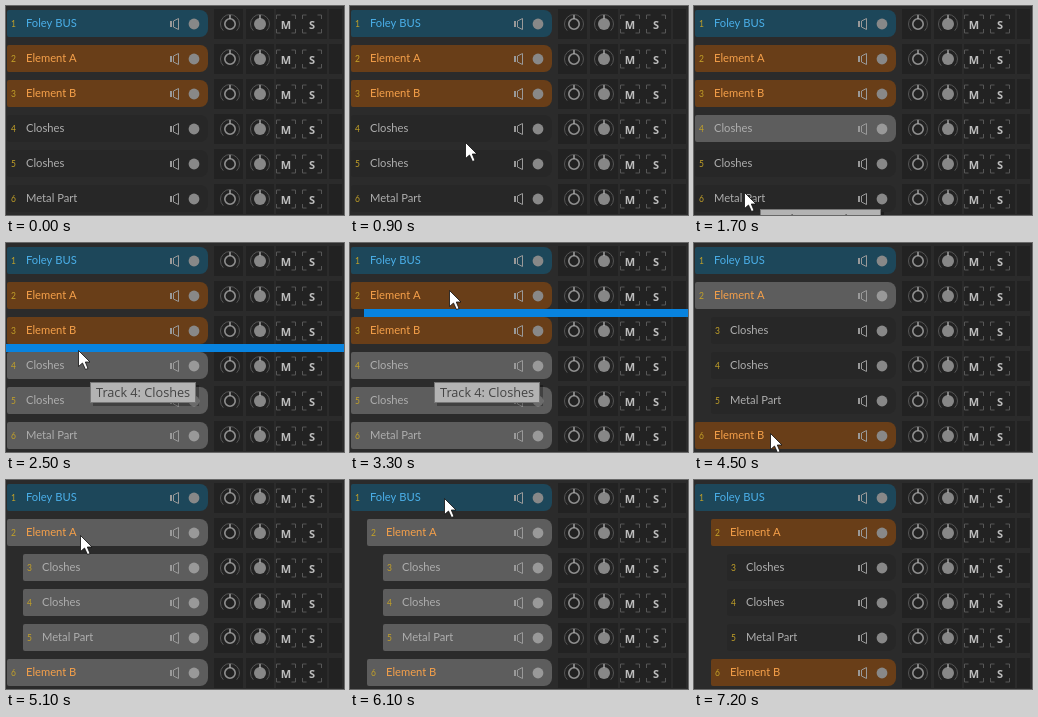
These frames come from a looping animation (338x209 px, 8300 ms). An HTML page with a canvas:

```html
<!DOCTYPE html>
<html lang="en">
<head>
<meta charset="utf-8">
<title>Track folders</title>
<style>
  html, body { margin: 0; width: 100%; height: 100%; overflow: hidden; background: #2b2b2b; }
  canvas { display: block; }
</style>
</head>
<body>
<canvas id="stage" width="338" height="209"></canvas>
<script>
const stage = document.getElementById('stage');
const ctx = stage.getContext('2d');
const LOOP = 8300, STEP = 100;
const PITCH = 35, BAR_HEIGHT = 27, BAR_RIGHT = 202, INDENT = 16, LINE_HEIGHT = 8;
const SELECTED = '#5d5d5d';

const makeTrack = (name, bar, color) => ({ name, bar, color });
const bus = makeTrack('Foley BUS', '#1d475a', '#4bb0ea');
const elementA = makeTrack('Element A', '#693e18', '#f5a04a');
const elementB = makeTrack('Element B', '#693e18', '#f5a04a');
const closhes = makeTrack('Closhes', '#272727', '#aeaeae');
const metal = makeTrack('Metal Part', '#272727', '#aeaeae');
const parts = [closhes, closhes, metal];

// A nested list is a folder; its depth sets the indent.
const flatten = (tree, depth = 0) => tree.flatMap(item =>
  Array.isArray(item) ? flatten(item, depth + 1) : { ...item, depth });

const select = (first, last = first) => ({ first, last });
const dropAt = (row, depth) => ({ row, depth });
const trackTip = (row, name, x, y) => ({ text: `Track ${row}: ${name}`, x, y, fill: '#b3b3b3' });
const panTip = { text: 'Pan: center (double click to set to center)', x: 110, y: 118, fill: '#fff' };

// Each entry changes part of the state from its time on.
const story = [
  [0, { rows: flatten([bus, elementA, elementB, ...parts]) }],
  [1100, { selection: select(3) }],
  [1700, { tip: trackTip(6, 'Metal Part', 66, 203) }],
  [1800, { tip: null, selection: select(3, 5) }],
  [2300, { tip: trackTip(4, 'Closhes', 84, 139) }],
  [2500, { drop: dropAt(3, 0) }],
  [2600, { drop: dropAt(2, 0) }],
  [3100, { drop: dropAt(2, 1) }],
  [3500, { drop: null, tip: null, selection: select(2, 4),
           rows: flatten([bus, elementA, parts, elementB]) }],
  [3800, { selection: select(1) }],
  [3900, { tip: panTip }],
  [4300, { tip: null }],
  [4700, { selection: select(1, 5) }],
  [5300, { drop: dropAt(1, 0) }],
  [5500, { drop: dropAt(1, 1) }],
  [5900, { drop: null, rows: flatten([bus, [elementA, parts, elementB]]) }],
  [6300, { selection: select(0) }],
  [7200, { selection: null }]
];

// Pointer glides: start, duration, destination.
const glides = [
  [500, 800, 79, 119], [1300, 100, 50, 186], [1800, 300, 68, 123],
  [2400, 300, 84, 60], [2900, 400, 99, 47], [3600, 100, 97, 50],
  [4000, 500, 76, 190], [4700, 400, 74, 55], [5200, 300, 88, 15],
  [5700, 400, 94, 18], [6300, 300, 150, 70]
];

function pointerAt(t) {
  if (t < 500 || t >= 6600) return null;
  let x = 150, y = 153;
  for (const [start, duration, toX, toY] of glides) {
    const p = Math.min(1, Math.max(0, (t - start) / duration));
    const eased = p * p * (3 - 2 * p);
    x += (toX - x) * eased;
    y += (toY - y) * eased;
  }
  return [Math.round(x), Math.round(y)];
}

const rowTop = row => 4 + row * PITCH;

function rect(x, y, w, h, color) {
  ctx.fillStyle = color;
  ctx.fillRect(x, y, w, h);
}

function label(text, x, y, font, color, align = 'left') {
  ctx.font = font;
  ctx.fillStyle = color;
  ctx.textAlign = align;
  ctx.fillText(text, x, y);
}

function stroke(points, color, width = 1, close = false) {
  ctx.beginPath();
  points.forEach(([x, y]) => ctx.lineTo(x, y));
  if (close) ctx.closePath();
  ctx.strokeStyle = color;
  ctx.lineWidth = width;
  ctx.stroke();
}

function arc(x, y, r, color, width, from = 0, to = 2 * Math.PI) {
  ctx.beginPath();
  ctx.arc(x, y, r, from, to);
  ctx.strokeStyle = color;
  ctx.lineWidth = width;
  ctx.stroke();
}

function disc(x, y, r, color) {
  ctx.beginPath();
  ctx.arc(x, y, r, 0, 2 * Math.PI);
  ctx.fillStyle = color;
  ctx.fill();
}

function knob(x, y, filled) {
  arc(x, y, 9.5, '#555', 1, 0.75 * Math.PI, 2.25 * Math.PI);
  if (filled) disc(x, y, 6, '#878787');
  else arc(x, y, 5.2, '#909090', 1.6);
  stroke([[x, y - 9], [x, y - 5]], '#aaa', 1.4);
}

function letterButton(letter, x, y) {
  for (const sx of [-1, 1]) for (const sy of [-1, 1]) {
    const cx = x + sx * 9.5, cy = y + sy * 9;
    stroke([[cx - sx * 4, cy], [cx, cy], [cx, cy - sy * 4]], '#575757');
  }
  label(letter, x, y + 4.5, 'bold 11px "Open Sans", sans-serif', '#bdbdbd', 'center');
}

function speaker(x, y) {
  rect(x, y - 3, 2, 6, '#999');
  stroke([[x + 3.5, y - 3], [x + 8.5, y - 5.5], [x + 8.5, y + 5.5], [x + 3.5, y + 3]], '#999', 1, true);
}

function drawRow(track, row, selected) {
  const top = rowTop(row), y = top + 14, left = 1 + track.depth * INDENT;
  ctx.beginPath();
  ctx.roundRect(left, top, BAR_RIGHT - left, BAR_HEIGHT, [2, 8, 8, 2]);
  ctx.fillStyle = selected ? SELECTED : track.bar;
  ctx.fill();
  label(row + 1, left + 4, y + 3, '8.5px Lato, sans-serif', '#c3a128');
  label(track.name, left + 19, y + 3, '11.2px Lato, sans-serif', track.color);
  speaker(164, y);
  disc(188, y, 5.4, selected ? '#999' : '#888');

  for (const [x, width] of [[208, 29], [240, 28], [270, 51], [323, 13]])
    rect(x, top - 1, width, 30, '#222');
  knob(224, y, false);
  knob(254, y, true);
  letterButton('M', 280, y);
  letterButton('S', 306, y);
}

function drawTip({ text, x, y, fill }) {
  const font = '12.7px "Open Sans", sans-serif', height = 21;
  ctx.font = font;
  const width = Math.round(ctx.measureText(text).width) + 12;
  rect(x + 3, y + 3, width, height, 'rgba(0,0,0,.3)');
  rect(x, y, width, height, '#777');
  rect(x + 1, y + 1, width - 2, height - 2, fill);
  label(text, x + 6, y + 15, font, '#444');
}

function drawPointer([x, y]) {
  ctx.beginPath();
  [[0, 0], [0, 16], [4, 12.5], [7, 19], [9.5, 18], [6.8, 11.5], [11.5, 11.5]]
    .forEach(([dx, dy]) => ctx.lineTo(x + dx + 0.5, y + dy + 0.5));
  ctx.closePath();
  ctx.fillStyle = '#fff';
  ctx.fill();
  ctx.strokeStyle = '#111';
  ctx.lineWidth = 0.8;
  ctx.stroke();
}

function draw(t) {
  const past = story.filter(([at]) => at <= t).map(([, change]) => change);
  const { rows, selection, drop, tip } = Object.assign({}, ...past);
  const pointer = pointerAt(t);

  rect(0, 0, stage.width, stage.height, '#2b2b2b');
  rows.forEach((track, row) =>
    drawRow(track, row, selection && row >= selection.first && row <= selection.last));
  if (drop) {
    const x = drop.depth * 14;
    rect(x, rowTop(drop.row) - LINE_HEIGHT, stage.width - x, LINE_HEIGHT, '#0883df');
  }
  if (tip) drawTip(tip);
  if (pointer) drawPointer(pointer);
}

const start = performance.now();
function tick() {
  const t = (performance.now() - start) % LOOP;
  draw(Math.floor(t / STEP) * STEP);
  requestAnimationFrame(tick);
}
tick();
</script>
</body>
</html>
```
